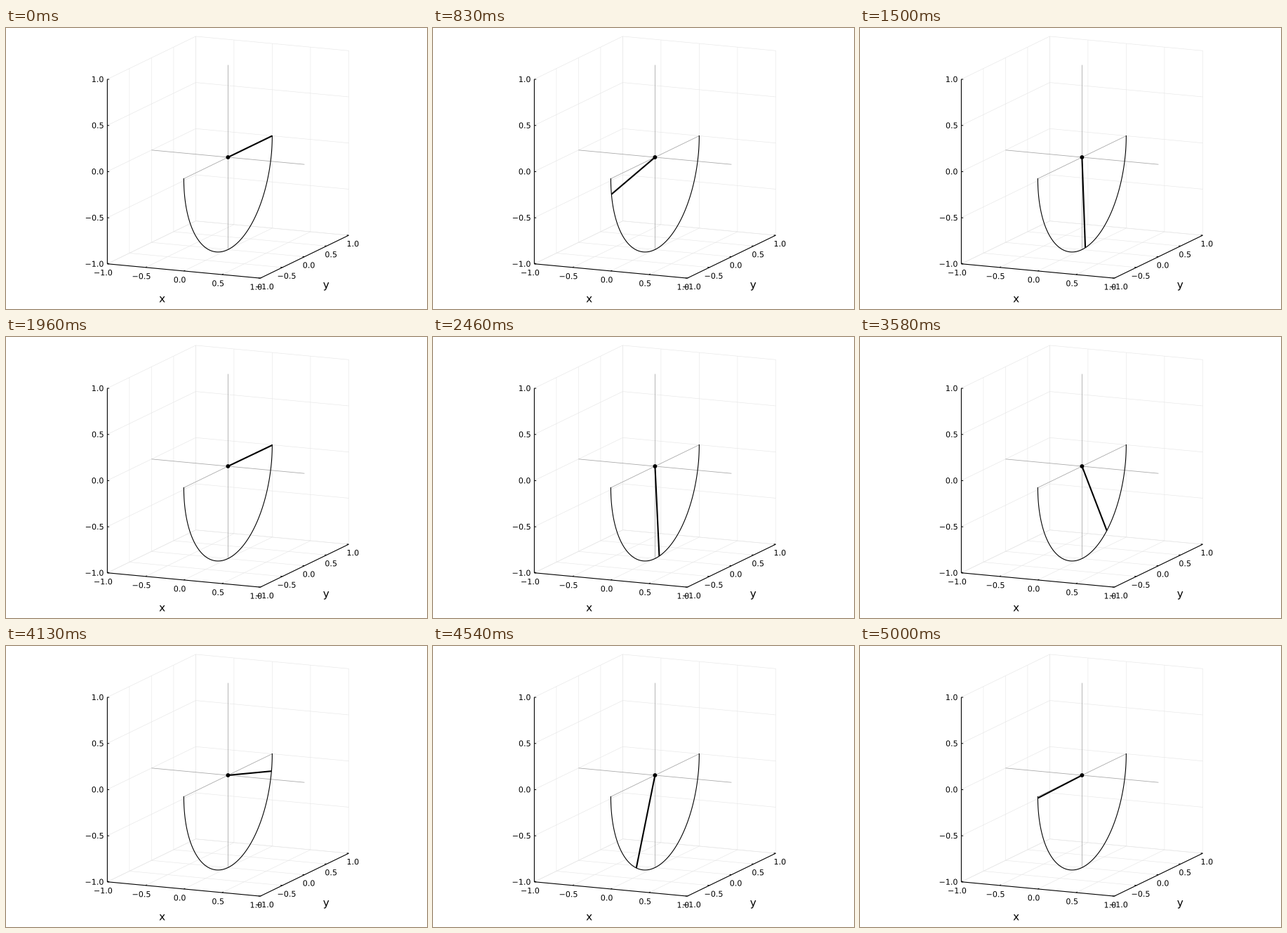
These frames come from a looping animation (600 px wide and 400 px high, 5.04 s). A matplotlib script:

```python
import numpy as np
import matplotlib.pyplot as plt
from matplotlib.animation import FuncAnimation
from matplotlib.collections import LineCollection
from matplotlib.patches import Circle, PathPatch
from matplotlib.textpath import TextPath
from matplotlib.transforms import Affine2D

W, H, DPI = 600, 400, 100
PX = 72 / DPI          # one pixel in points
POSES = 121            # poses per loop, shown at 24 per second
PERIOD = 47.55         # swing period in poses
TICKS = np.linspace(-1, 1, 5)

plt.rcParams["font.family"] = "DejaVu Sans"
plt.rcParams["path.snap"] = False


def project(x, y, z):
    return 316.4 + 109 * x + 63 * y, 184 + 10.2 * x - 30.5 * y - 131.4 * z


def swing(count, sub=20):
    """Angles of a pendulum released from horizontal, by RK4."""
    w2 = (2 * np.pi * 1.18034 / PERIOD) ** 2
    h = 1 / sub

    def rate(s):
        return np.array([s[1], -w2 * np.sin(s[0])])

    state, angles = np.array([np.pi / 2, 0.0]), []
    for _ in range(count):
        angles.append(state[0])
        for _ in range(sub):
            a = rate(state)
            b = rate(state + h / 2 * a)
            c = rate(state + h / 2 * b)
            d = rate(state + h * c)
            state = state + h / 6 * (a + 2 * b + 2 * c + d)
    return angles


fig = plt.figure(figsize=(W / DPI, H / DPI), dpi=DPI, facecolor="white")
ax = fig.add_axes([0, 0, 1, 1])
ax.set(xlim=(0, W), ylim=(H, 0))
ax.axis("off")


def segments(pairs, color, width, z):
    lines = [[project(*p), project(*q)] for p, q in pairs]
    ax.add_collection(LineCollection(lines, colors=color, linewidths=width * PX,
                                     capstyle="butt", zorder=z), autolim=False)


def label(x, y, text, size=8, right=False):
    """Unhinted text, centred on (x, y) or ending at x."""
    path = TextPath((0, 0), text, size=size / PX)
    box = path.get_extents()
    anchor = box.x1 if right else (box.x0 + box.x1) / 2
    place = Affine2D().translate(-anchor, -(box.y0 + box.y1) / 2).scale(1, -1)
    path = place.translate(x, y).transform_path(path)
    ax.add_patch(PathPatch(path, fc="black", lw=0, zorder=7))


# Grid on the floor, the left wall and the back wall
grid = []
for t in TICKS:
    grid += [((t, -1, -1), (t, 1, -1)), ((t, 1, -1), (t, 1, 1)),
             ((-1, t, -1), (1, t, -1)), ((-1, t, -1), (-1, t, 1)),
             ((-1, -1, t), (-1, 1, t)), ((-1, 1, t), (1, 1, t))]
segments(grid, "#e6e6e6", 0.6, 1)

# Outer axes with tick marks
frame = [((-1, -1, -1), (1, -1, -1)), ((1, -1, -1), (1, 1, -1)),
         ((-1, -1, -1), (-1, -1, 1))]
segments(frame, "black", 1.1, 2)
marks = []
for t in TICKS:
    marks += [((t, -1, -1), (t, -0.97, -1)), ((1, t, -1), (0.975, t, -1)),
              ((-1, -1, t), (-0.975, -1, t))]
segments(marks, "black", 1, 2)

for t in TICKS:
    text = f"{t:.1f}".replace("-", "\u2212")
    x, y = project(t, -1, -1)
    label(x - 5.8, y + 12.4, text)
    x, y = project(1, t, -1)
    label(x + 6.2, y + 11.9, text)
    x, y = project(-1, -1, t)
    label(x - 5.7, y, text, right=True)
label(222.6, 386.2, "x", 11)
label(456.3, 367.8, "y", 11)

# Centre lines, path, pivot and rod
segments([((-1, 0, 0), (1, 0, 0)), ((0, -1, 0), (0, 1, 0)),
          ((0, 0, -1), (0, 0, 1))], "#a6a6a6", 0.8, 3)
arc = np.linspace(-np.pi / 2, np.pi / 2, 120)
ax.plot(*project(0, np.sin(arc), -np.cos(arc)), color="black", lw=1.1 * PX, zorder=4)
pivot = project(0, 0, 0)
ax.add_patch(Circle(pivot, 2.9, fc="black", lw=0, zorder=6))
rod, = ax.plot([], [], color="black", lw=2.1 * PX, solid_capstyle="butt", zorder=5)

angles = swing(POSES)


def update(i):
    # 10 ms ticks; each pose starts at its 1/24 s time rounded to a tick
    a = angles[(6 * (2 * i + 1) - 1) // 50]
    x, y = project(0, np.sin(a), -np.cos(a))
    rod.set_data([pivot[0], x], [pivot[1], y])
    return rod,


anim = FuncAnimation(fig, update, frames=504, interval=10, repeat=True,
                     repeat_delay=0, cache_frame_data=False)
plt.show()
```
